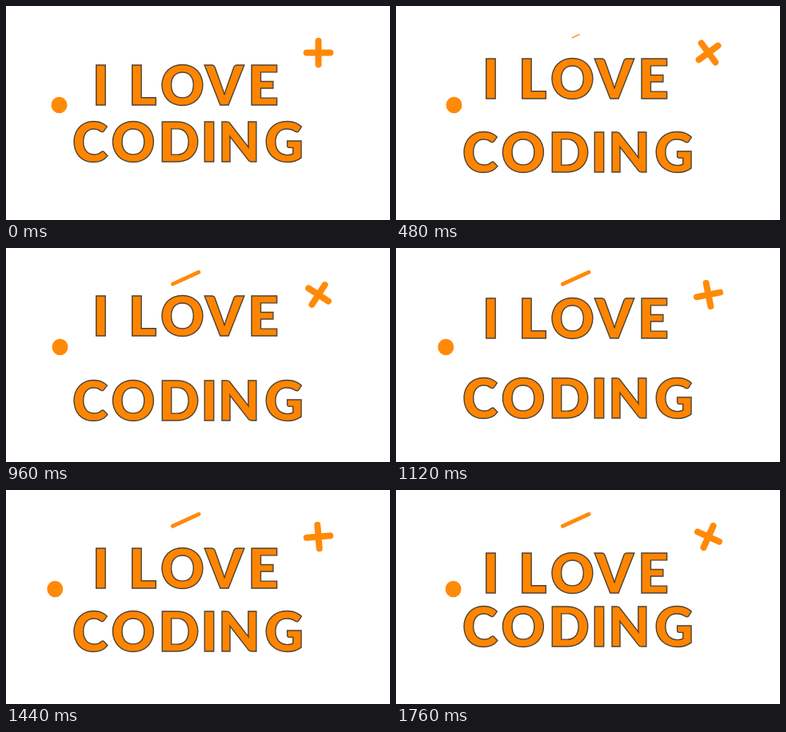
An HTML page that plays this animation: 480x268 px, repeating every 1800 ms.

```html
<!DOCTYPE html>
<html lang="en">
<head>
<meta charset="utf-8">
<title>I love coding</title>
<style>
  html, body { margin: 0; width: 100%; height: 100%; overflow: hidden; background: #fff; }
  svg { display: block; width: 100vw; height: 100vh; }
  text {
    font: 900 67.4px Lato, "Open Sans", sans-serif;
    text-anchor: middle;
    fill: #ff8500;
    stroke: #4d4238;
    stroke-width: 1.4;
  }
  .mark { fill: none; stroke: #ff8a08; stroke-linecap: round; }
</style>
</head>
<body>
<svg viewBox="0 0 480 268">
  <text id="top" x="118.5 144 170.8 220.5 273 321.5">I LOVE</text>
  <text id="bottom" x="105 159 216.2 254 291.5 347.5">CODING</text>
  <ellipse id="dot" cy="124" rx="10" ry="10.3" fill="#ff8a08"/>
  <path id="plus" class="mark" stroke-width="8" d="M-14.8 0H14.8M0-14.8V14.8"/>
  <path id="dash" class="mark" stroke-width="4.8" d="M-16.3 7.5L16.3-7.5"/>
</svg>
<script>
  const LOOP = 1800, STEP = 40;
  const [topLine, bottomLine, dot, plus, dash] =
    ["top", "bottom", "dot", "plus", "dash"].map(id => document.getElementById(id));

  // Each key is [time, value]; neighbours are joined by a sine ease.
  function track(t, keys) {
    if (t <= keys[0][0]) return keys[0][1];
    for (let i = 1; i < keys.length; i++) {
      const [t0, v0] = keys[i - 1], [t1, v1] = keys[i];
      if (t <= t1) return v0 + (v1 - v0) * (1 - Math.cos(Math.PI * (t - t0) / (t1 - t0))) / 2;
    }
    return keys[keys.length - 1][1];
  }

  function draw(t) {
    topLine.setAttribute("y", track(t, [[0, 124.1], [870, 109.6], [1770, 129.1]]));
    bottomLine.setAttribute("y", track(t, [[0, 195], [870, 216.8], [1770, 196]]));
    dot.setAttribute("cx", track(t, [[0, 66.5], [660, 73.8], [1305, 59.7], [1925, 74]]));
    const angle = track(t, [[60, 0], [2100, -360]]);
    plus.setAttribute("transform", `translate(390.5 58.5) rotate(${angle})`);
    const size = track(t, [[195, 0], [1000, 1]]);
    dash.setAttribute("transform", `translate(224.7 37.7) scale(${size})`);
    dash.setAttribute("visibility", size > 0 ? "visible" : "hidden");
  }

  const start = performance.now();
  function frame() {
    const t = (performance.now() - start) % LOOP;
    draw(Math.floor(t / STEP) * STEP);
    requestAnimationFrame(frame);
  }
  draw(0);
  requestAnimationFrame(frame);
</script>
</body>
</html>
```
